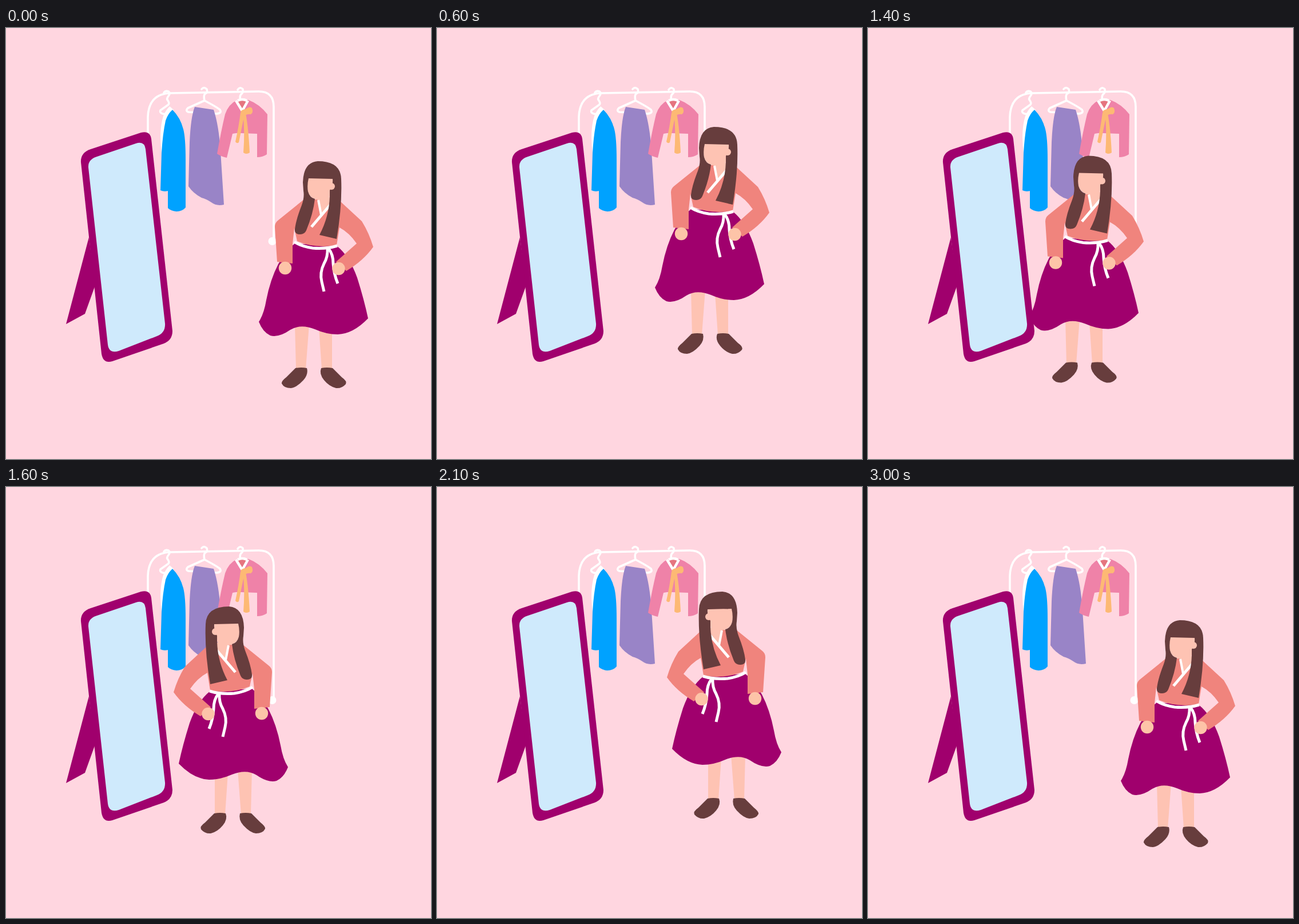
An HTML page for the animation above (3400 ms loop, 743 px wide and 754 px high).

```html
<!DOCTYPE html>
<html lang="en">
<head>
<meta charset="utf-8">
<title>Trying on a hanbok</title>
<style>
  html, body { margin: 0; width: 100%; height: 100%; overflow: hidden; background: #ffd6e0; }
  svg { display: block; width: 100%; height: 100%; }
  .line { fill: none; stroke: #fff; stroke-width: 3.6; stroke-linecap: round; stroke-linejoin: round; }
  .ribbon { fill: none; stroke: #fff; stroke-width: 5; stroke-linejoin: round; }
  .plum { fill: #a0006d; }
  .brown { fill: #673d3d; }
  .skin { fill: #fec3b3; }
  .hand { fill: #fdc4a8; }
  .coral { fill: #f0847d; }
  .orange { fill: #fdb974; }
</style>
</head>
<body>
<svg viewBox="0 0 743 754">
  <rect width="743" height="754" fill="#ffd6e0"/>

  <g id="rack">
    <path class="line" d="M248 190V156Q249 116 286 114L442 111Q468 111 468 138V373"/>
    <circle cx="465.500" cy="373" r="7" fill="#fff"/>
    <path class="line" d="M276 113Q279 109 284 111Q288 114 284 119Q280 124 283 127Q286 131 284 134L270 144Q268 148 274 150L280 151"/>
    <path class="line" d="M342 107Q346 102 351 107Q353 113 348 115Q345 118 347 127L318 140Q313 145 319 147L368 150Q378 149 374 143Q368 138 347 127"/>
    <path class="line" d="M405 108Q409 102 414 107Q415 113 411 116Q408 119 410 127"/>
  </g>

  <g id="clothes">
    <path fill="#fff" d="M286 137L293 143Q280 165 276 195L272 219Q267 180 275 154Q279 144 286 137Z"/>
    <path fill="#00a2ff" d="M291 143Q305 157 310 177Q314 192 314 230V314Q308 321 298 321Q288 320 283 315V285Q276 287 270 284L272 218Q274 185 279 162Q283 150 291 143Z"/>
    <path fill="#9984c7" d="M330 138L363 143Q372 170 375 215L381 309Q368 312 359 305Q350 299 342 297Q327 289 319 277L321 200Q323 155 330 138Z"/>
    <path fill="#ef82a8" d="M404 126Q389 133 383 151Q376 180 369 220Q376 225 386 227L396 185Q405 183 412 184L439 185V226Q449 226 456 221L457 151Q443 133 424 126Z"/>
    <path fill="#e5757f" d="M403 127H424L413 146Z"/>
    <path class="line" style="stroke-width:4.500;stroke-linecap:butt" d="M402 127L413 145L423 127M405 127Q413 123 421 127"/>
    <g class="orange">
      <path d="M410 148Q407 172 401 199Q404 203 407 200L417 151Z"/>
      <path d="M414 149Q418 180 415 218Q420 222 426 218Q424 176 419 149Z"/>
      <path d="M410 146Q414 142 419 142Q426 136 430 140Q433 148 428 151Q422 150 418 153Q412 153 410 146Z"/>
    </g>
  </g>

  <g id="girl">
    <path class="skin" d="M505 518H530L524 597H507ZM547 524H570V597H552Z"/>
    <path class="brown" d="M506 595Q516 593 526 595Q529 606 520 616Q508 629 498 630Q486 630 482 622Q481 618 490 611Z"/>
    <path class="brown" d="M551 595Q561 593 571 595L587 611Q597 618 594 623Q587 631 577 630Q565 627 556 616Q547 605 551 595Z"/>
    <path class="plum" d="M505 377L578 381Q600 398 614 437Q626 475 633 508Q607 535 580 536Q560 536 540 527Q515 517 497 528Q477 542 462 538Q449 532 442 514Q451 500 455 476Q462 440 476 413Q490 388 505 377Z"/>
    <path class="coral" d="M522 299L475 337Q470 341 470 348L474 409L501 412V378L504 350L509 373Q540 386 578 380L583 349Q600 358 613 377L577 409L595 425Q625 407 642 383Q635 359 622 338L583 302Z"/>
    <path class="skin" d="M544 296H567V311L550 328Z"/>
    <path class="skin" d="M526 260H571V284Q569 300 547 301Q527 298 527 278Z"/>
    <path class="ribbon" style="stroke-width:4" d="M546 301L551 327"/>
    <path class="ribbon" d="M568 308L534 348"/>
    <path class="brown" d="M519 270Q520 235 545 233Q585 233 586 264Q588 310 578 369L548 362Q565 330 566 294V284Q572 276 571 264L529 263Q526 275 528 286Q531 297 540 299Q537 325 525 354Q522 361 514 361Q504 361 505 352Q507 335 517 310Q522 296 520 285Z"/>
    <circle class="skin" cx="569" cy="277" r="6"/>
    <path class="ribbon" d="M504 374Q516 382 536 385Q560 387 579 381"/>
    <path class="ribbon" d="M562 385Q563 400 556 412Q548 428 552 444L556 461"/>
    <path class="ribbon" d="M564 386Q572 396 572 412Q573 430 580 447"/>
    <circle class="hand" cx="488" cy="420" r="11.200"/>
    <circle class="hand" cx="581.500" cy="421" r="11.200"/>
  </g>

  <g id="mirror">
    <path class="plum" d="M145 366L105 518L138 500L156 450Z"/>
    <path class="plum" d="M131 235Q130 218 148 212L236 183Q252 179 254 194L291 530Q291 546 276 552L186 583Q170 588 167 570Z"/>
    <path fill="#cfeafc" d="M144 244Q143 230 159 225L227 202Q242 197 244 212L278 517Q279 533 264 539L197 565Q180 570 178 554Z"/>
  </g>
</svg>
<script>
  const LOOP = 3400, STEP = 100;
  const AXIS = 542;          // vertical line the girl turns about
  const TURN = 15, BACK = 30; // steps at which she faces away and returns

  // [dx, dy] per step; the last away pose holds until BACK
  const hop = [
    [0, 0], [0, 0], [-2, -4], [-9, -17], [-22, -34], [-40, -50], [-61, -60],
    [-81, -61.5], [-97, -61.5], [-112, -61], [-125, -57], [-136, -49],
    [-146, -37], [-154, -23], [-160, -9.5],
    [-157, -7], [-149, -24], [-133, -44], [-111, -58], [-86, -61.5],
    [-63, -59], [-40, -50], [-21, -34], [-7, -14], [1, 2], [4, 0]
  ];

  const girl = document.getElementById("girl");

  function pose(step) {
    if (step >= BACK) return "translate(0 0)";
    const [dx, dy] = hop[Math.min(step, hop.length - 1)];
    return step < TURN
      ? `translate(${dx} ${dy})`
      : `translate(${2 * AXIS + dx} ${dy}) scale(-1 1)`;
  }

  const start = performance.now();
  function draw() {
    const t = (performance.now() - start) % LOOP;
    girl.setAttribute("transform", pose(Math.floor(t / STEP)));
    requestAnimationFrame(draw);
  }
  draw();
</script>
</body>
</html>
```
